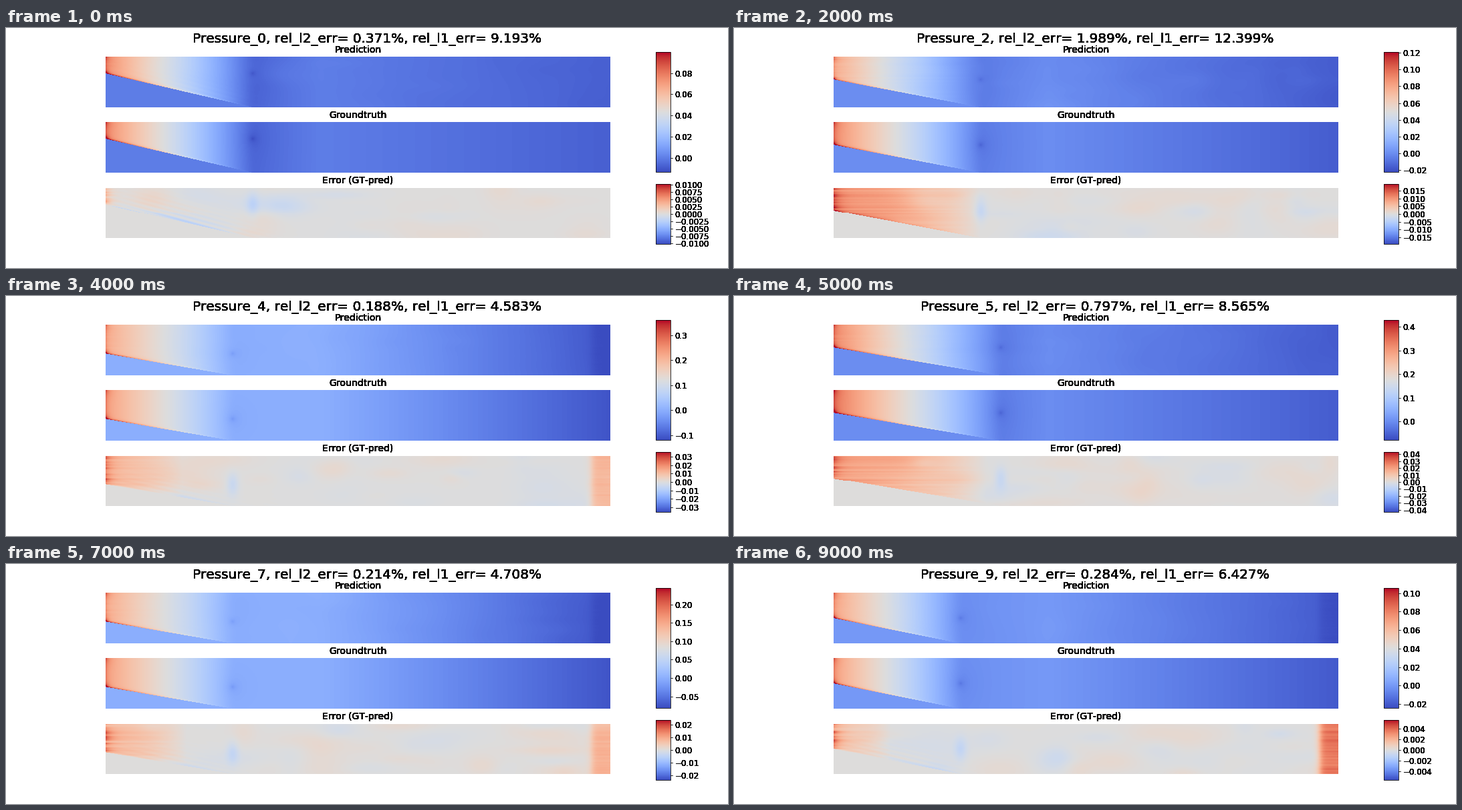
Recreate the animation shown at these times as a matplotlib script. Size 1080 by 360 pixels, loop 10000 ms.

```python
import numpy as np
import matplotlib.pyplot as plt
from matplotlib.animation import FuncAnimation
from matplotlib.patches import Rectangle
from matplotlib.ticker import MaxNLocator

plt.rcParams["text.kerning_factor"] = 6

W, H = 1080, 360
LEFT, RIGHT = 149, 904
NX, NY = RIGHT - LEFT, 76

# l2 error, l1 error, inlet gap, throat x, pressure limit, error limit
CASES = [
    (.371, 9.193, .33, 220, .0998, .01023),
    (.462, 8.274, .45, 190, .1050, .0056),
    (1.989, 12.399, .45, 220, .1208, .01942),
    (.528, 7.916, .50, 220, .1700, .0160),
    (.188, 4.583, .57, 190, .3600, .0355),
    (.797, 8.565, .45, 250, .4296, .0431),
    (2.143, 18.856, .45, 160, .0573, .00842),
    (.214, 4.708, .57, 190, .2444, .0238),
    (.316, 5.342, .50, 220, .3300, .0224),
    (.284, 6.427, .50, 190, .1054, .00563),
]

X, Y = np.meshgrid(np.arange(NX) + .5, np.arange(NY) + .5)


def blob(x, y, rx, ry):
    return np.exp(-((X - x) / rx) ** 2 - ((Y - y) / ry) ** 2)


def duct(gap, throat):
    """Wall height, distance above the ramp, fade along it, solid part."""
    wall = gap * NY
    above = wall + (NY - wall) * X / throat - Y
    fade = np.clip(1 - X / throat, 0, 1)
    return wall, above, fade, (above < 0) & (X < throat)


def ground_truth(gap, throat, zero):
    wall, above, fade, solid = duct(gap, throat)
    inlet = .68 + .0016 * (throat - 160)
    levels = [inlet, 1.4 * zero - .1, zero, .07 - .2 * zero]
    profile = np.interp(np.arange(-6, NX + 6), [0, throat, 320, NX], levels)
    field = np.convolve(profile, np.ones(13) / 13, "valid") + 0 * X
    field += .12 * np.exp(-X / 3) + .12 * np.exp(-np.hypot(X, Y) / 6)
    field += .30 * np.exp(-np.hypot(X, Y - wall) / 3)
    field += .30 * fade ** 1.5 * np.exp(-np.abs(above) / 1.2)
    spot = np.hypot(X - throat, Y - wall)
    field -= .05 * np.exp(-spot / 4) + .02 * np.exp(-spot / 22)
    field[solid] = zero
    return field


def error_field(seed, l2, gap, throat, outlet):
    wall, above, fade, solid = duct(gap, throat)
    rng = np.random.default_rng(seed)
    rows = np.convolve(rng.normal(size=NY + 2), [.3, .4, .3], "valid")[:, None]
    bias = np.clip(1.3 * l2 + 4 * (gap - .48), .05, 1)

    err = .5 * bias * np.clip(1 - (X / throat / bias) ** 2, 0, 1) * (1 + .12 * rows)
    err += .35 * np.exp(-X / 9) * (1 + .5 * rows)
    if throat < 200:
        err += outlet / (1 + np.exp((727 - X) / 3)) * (1 + .08 * rows)
    err += .3 * (l2 - 1) * fade * np.exp(-np.abs(above) / 1.5)
    fan = np.exp(-np.abs(above) / 13) * (.5 + .5 * np.cos(above * .9 + X / 28))
    err -= .27 * (1 - bias) * fan * blob(throat / 2, 40, throat * .4, 90)
    err -= .15 * blob(throat, wall, 9, 18)
    for _ in range(45):
        err += rng.uniform(-.07, .07) * blob(
            rng.uniform(0, NX), rng.uniform(0, NY),
            rng.uniform(15, 60), rng.uniform(6, 24))
    err[solid] = 0
    return err


fig = plt.figure(figsize=(W / 72, H / 72), dpi=72, facecolor="white")
ax = fig.add_axes([0, 0, 1, 1])


def text(x, y, s, size, **align):
    # repeated drawing gives the heavy edges
    for _ in range(10):
        ax.text(x, y, s, fontsize=size, family="DejaVu Sans", color="black", **align)


def image(field, x0, x1, top, bottom, lo=0, hi=1):
    ax.imshow(field, cmap="coolwarm", vmin=lo, vmax=hi, aspect="auto",
              extent=(x0, x1, bottom, top), interpolation="nearest")


def panel(title, field, top, bottom, baseline, lo=0, hi=1):
    image(field, LEFT, RIGHT, top, bottom, lo, hi)
    text(526.5, baseline, title, 14, ha="center", va="baseline")


def colorbar(top, bottom, lo, hi):
    x0, x1 = 972, 993.6
    image(np.linspace(1, 0, 256)[:, None], x0, x1, top, bottom)
    ax.add_patch(Rectangle((x0, top), x1 - x0, bottom - top, fill=False,
                           ec="black", lw=.8))
    ticks = MaxNLocator(9, steps=[1, 2, 2.5, 5, 10]).tick_values(lo, hi)
    decimals = len(f"{ticks[1] - ticks[0]:g}") - 2
    for tick in ticks[(ticks >= lo) & (ticks <= hi)]:
        y = bottom - (tick - lo) / (hi - lo) * (bottom - top)
        ax.plot([x1, x1 + 3.5], [y, y], color="black", lw=.8)
        label = f"{round(tick, 6) + 0.0:.{decimals}f}".replace("-", "\u2212")
        text(x1 + 7, y, label, 12, ha="left", va="center_baseline")


def draw(i):
    ax.clear()
    ax.axis("off")
    l2, l1, gap, throat, vmax, limit = CASES[i]
    vmin = -vmax * (.118 + 3.57 * gap ** 5)
    truth = ground_truth(gap, throat, -vmin / (vmax - vmin))
    err = error_field(40 + i, l2, gap, throat, .035 * vmax / limit)
    text(540, 7.2, f"Pressure_{i}, rel_l2_err= {l2:.3f}%, rel_l1_err= {l1:.3f}%",
         20, ha="center", va="top")
    panel("Prediction", truth - err * limit / (vmax - vmin), 43, 119, 37)
    panel("Groundtruth", truth, 141, 217, 135)
    panel("Error (GT-pred)", err, 240, 315, 233, -1, 1)
    colorbar(36, 216, vmin, vmax)
    colorbar(234, 324, -limit, limit)
    ax.set_xlim(0, W)
    ax.set_ylim(H, 0)


anim = FuncAnimation(fig, draw, frames=10, interval=1000, repeat=True, repeat_delay=0)
plt.show()
```
